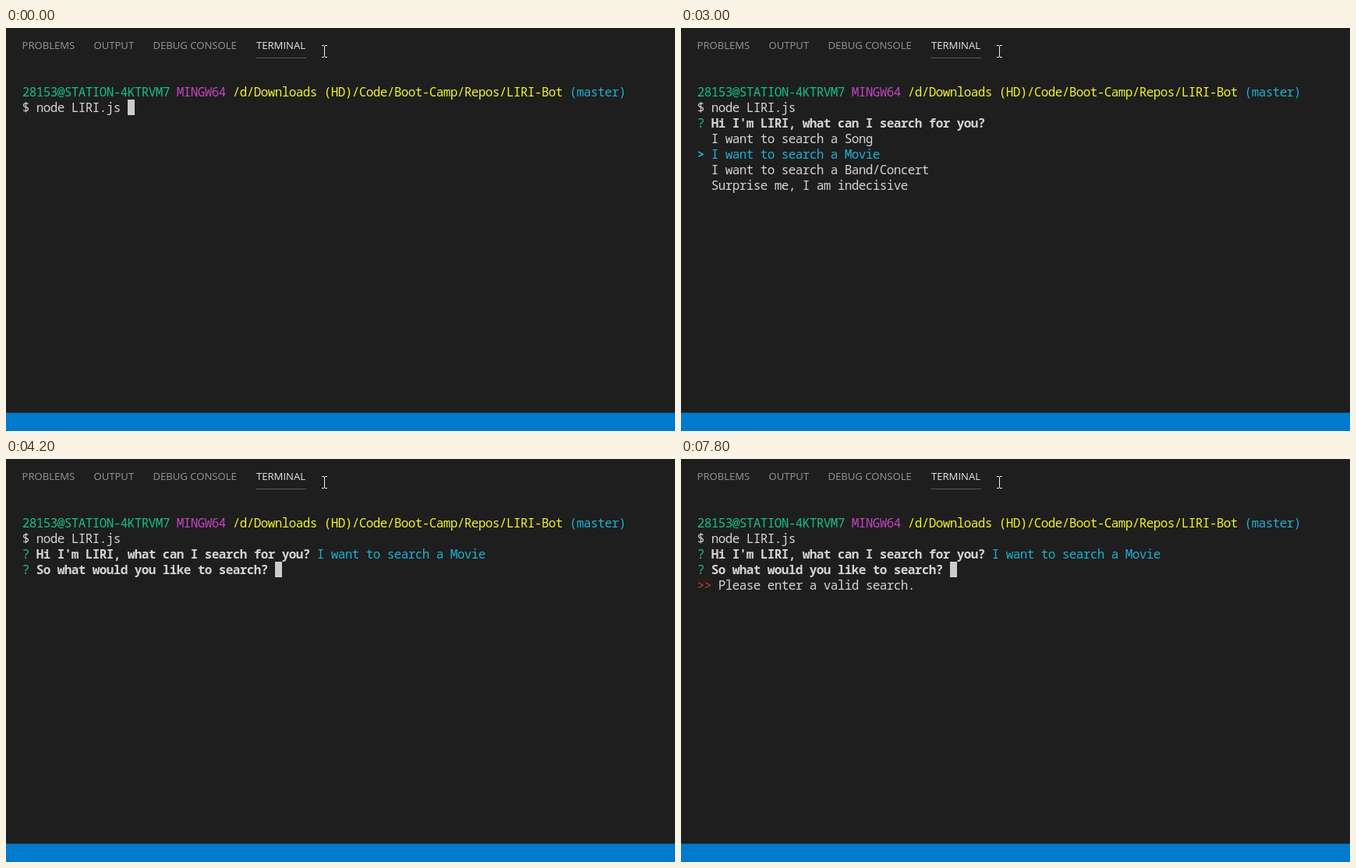
Animation of 858 by 518 pixels, one loop 8000 ms. Source, as an HTML page with a canvas:

```html
<!DOCTYPE html>
<html lang="en">
<head>
<meta charset="utf-8">
<title>Terminal</title>
<style>
  html, body { margin: 0; width: 100%; height: 100%; overflow: hidden; background: #1e1e1e; }
  canvas { display: block; }
</style>
</head>
<body>
<canvas id="stage" width="858" height="518"></canvas>
<script>
const ctx = document.getElementById('stage').getContext('2d');
const LOOP = 8000;
const CELL = 9, ROW = 20, LEFT = 21, TOP = 72;
const MONO = '16px "Noto Sans Mono", "DejaVu Sans Mono", monospace';
const SANS = '500 13.1px "Open Sans", "Noto Sans", sans-serif';
const C = {
  back: '#1e1e1e', text: '#d4d4d4', block: '#cccccc', green: '#12c281', magenta: '#c244c2',
  yellow: '#f0f02a', cyan: '#1cb0d4', red: '#d63a3a', bar: '#007acc'
};

const OPTIONS = [
  'I want to search a Song',
  'I want to search a Movie',
  'I want to search a Band/Concert',
  'Surprise me, I am indecisive'
];

// Each step holds until the next one begins.
const STEPS = [
  { at: 0, view: 'command' },
  { at: 800, view: 'wait' },
  { at: 1600, view: 'menu', pick: 0, hint: true },
  { at: 3000, view: 'menu', pick: 1 },
  { at: 3200, view: 'menu', pick: 2 },
  { at: 3800, view: 'menu', pick: 1 },
  { at: 4200, view: 'input' },
  { at: 5800, view: 'input', error: true }
];

function rect(color, x, y, w, h) {
  ctx.fillStyle = color;
  ctx.fillRect(x, y, w, h);
}

function write(row, col, str, color = C.text, weight = 500) {
  ctx.font = weight + ' ' + MONO;
  ctx.letterSpacing = '-0.6px';
  ctx.fillStyle = color;
  ctx.fillText(str, LEFT + col * CELL - 0.3, TOP + row * ROW + 16);
  return col + str.length;
}

function block(row, col) {
  rect(C.block, LEFT + col * CELL, TOP + row * ROW, CELL, ROW);
}

function question(row, str) {
  write(row, 0, '?', C.green);
  return write(row, 2, str, C.text, 700) + 1;
}

function tab(str, x, color) {
  ctx.font = SANS;
  ctx.letterSpacing = '0px';
  ctx.fillStyle = color;
  ctx.fillText(str, x, 27);
}

function pointer() {
  const c = '#f0f0f0';
  rect(c, 408, 23, 1, 14);
  for (const y of [22, 37]) {
    rect(c, 405, y, 3, 1);
    rect(c, 409, y, 3, 1);
  }
}

function panel() {
  rect(C.back, 0, 0, 858, 518);
  rect(C.bar, 0, 494.5, 858, 23.5);
  tab('PROBLEMS', 20.5, '#969696');
  tab('OUTPUT', 112.5, '#969696');
  tab('DEBUG CONSOLE', 188.5, '#969696');
  tab('TERMINAL', 321, '#e7e7e7');
  rect('#595959', 321, 38, 64, 1);
  pointer();
}

function prompt() {
  let col = write(0, 0, '28153@STATION-4KTRVM7', C.green);
  col = write(0, col + 1, 'MINGW64', C.magenta);
  col = write(0, col + 1, '/d/Downloads (HD)/Code/Boot-Camp/Repos/LIRI-Bot', C.yellow);
  write(0, col + 1, '(master)', C.cyan);
  return write(1, 0, '$ node LIRI.js') + 1;
}

function menu(pick, hint) {
  const col = question(2, "Hi I'm LIRI, what can I search for you?");
  if (hint) write(2, col, '(Use arrow keys)');
  OPTIONS.forEach((str, i) => write(3 + i, 2, str, i === pick ? C.cyan : C.text));
  write(3 + pick, 0, '>', C.cyan, 600);
}

function input(error) {
  const col = question(2, "Hi I'm LIRI, what can I search for you?");
  write(2, col, OPTIONS[1], C.cyan);
  block(3, question(3, 'So what would you like to search?'));
  if (error) {
    write(4, 0, '>>', C.red);
    write(4, 3, 'Please enter a valid search.');
  }
}

function draw(t) {
  const step = STEPS.filter(s => s.at <= t).pop();
  panel();
  const end = prompt();
  if (step.view === 'command') block(1, end);
  if (step.view === 'wait') block(2, 0);
  if (step.view === 'menu') menu(step.pick, step.hint);
  if (step.view === 'input') input(step.error);
}

const start = performance.now();
function tick() {
  draw((performance.now() - start) % LOOP);
  requestAnimationFrame(tick);
}
tick();
</script>
</body>
</html>
```
